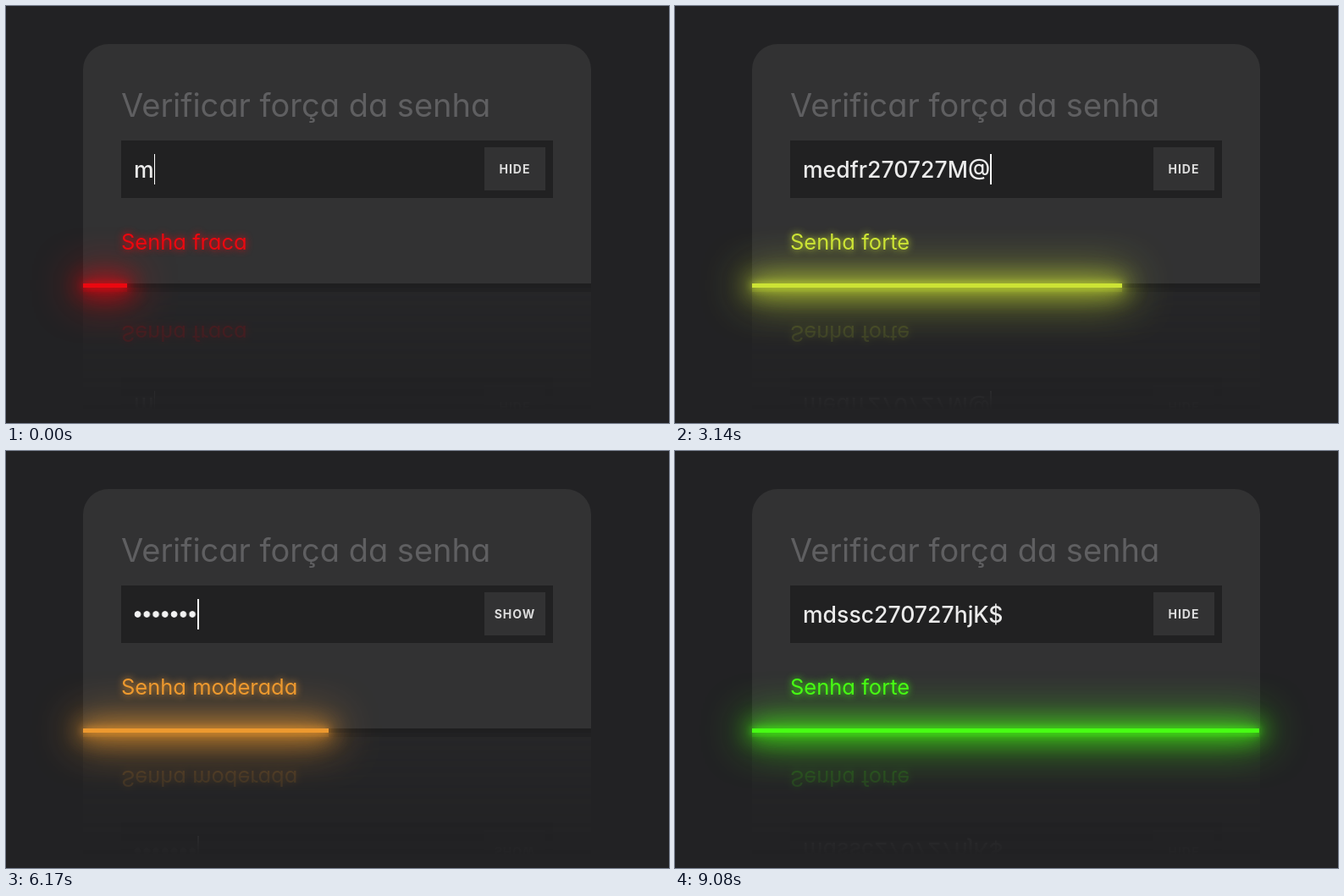
An HTML page for the animation above (9140 ms loop, 783 px wide and 493 px high).

```html
<!DOCTYPE html>
<html lang="pt">
<head>
<meta charset="utf-8">
<title>Verificar força da senha</title>
<style>
  html, body { margin: 0; width: 100%; height: 100%; overflow: hidden; background: #222224; }
  body {
    position: relative;
    font-family: Inter, "Open Sans", sans-serif;
    font-feature-settings: "cv11";
    font-optical-sizing: none;
  }
  #card, #card div { position: absolute; top: 0; left: 0; white-space: pre; }
  #card#card {
    left: 91px; top: 45px; width: 600px; height: 288px;
    -webkit-box-reflect: below 0 linear-gradient(transparent 50%, #0004);
  }
  #card #panel { width: 600px; height: 283px; border-radius: 30px 30px 0 0; background: #323233; }
  #card #title { left: 45px; top: 47px; font-size: 38px; line-height: 50px; color: #5f5f61; }
  #card #field { left: 45px; top: 114px; width: 510px; height: 68px; background: #212122; }
  #card #entry {
    left: 15px; height: 68px; display: flex; align-items: center;
    font-size: 26.6px; font-weight: 500; color: #ebebeb;
  }
  #card #dots {
    position: static; height: 8px;
    background: radial-gradient(circle at 4.5px 50%, #f2f2f2 3.4px, transparent 4.2px) 0 0 / 10.77px 8px;
  }
  #card #caret { position: static; width: 1.5px; height: 36px; background: #fff; }
  #card #button {
    left: 429px; top: 8px; width: 72px; height: 51px; background: #323233; color: #dcdcdc;
    display: flex; align-items: center; justify-content: center;
    font-size: 14px; font-weight: 700; letter-spacing: 1px;
  }
  #card #message {
    left: 45px; top: 214px; font-size: 25.5px; line-height: 40px;
    text-shadow: 0 0 8px currentColor;
  }
  #card #track { top: 283px; width: 600px; height: 5px; background: #1f1f20; }
  #card #bar {
    height: 5px; background: currentColor;
    box-shadow: 0 0 10px currentColor, 0 0 26px 3px currentColor, 0 0 52px 6px currentColor;
  }
</style>
</head>
<body>
<div id="card">
  <div id="panel"></div>
  <div id="title">Verificar força da senha</div>
  <div id="field">
    <div id="entry"><span id="text"></span><div id="dots"></div><div id="caret"></div></div>
    <div id="button"></div>
  </div>
  <div id="message"></div>
  <div id="track"><div id="bar"></div></div>
</div>
<script>
const LOOP = 9140, TRANSITION = 500, HIDDEN_FROM = 5390, HIDDEN_TO = 7600;
const LEVELS = [
  { label: '', width: 0, color: [235, 8, 16] },
  { label: 'Senha fraca', width: 10, color: [235, 8, 16] },
  { label: 'Senha moderada', width: 66, color: [238, 220, 61] },
  { label: 'Senha forte', width: 100, color: [70, 255, 20] }
];
const $ = id => document.getElementById(id);

const strength = s => /\W/.test(s) ? 3 : /\d/.test(s) && s.length >= 7 ? 2 : 1;

// Keystrokes and the strength changes they cause
const keys = [], changes = [{ time: -1000, level: 0 }];
let value = '';
function press(time, next, typed) {
  value = next;
  keys.push({ time, value, typed });
  const level = strength(value);
  if (level !== changes[changes.length - 1].level) changes.push({ time, level });
}
function type(str, start, step = 0) {
  [...str].forEach((ch, i) => press(start + i * step, value + ch, true));
}
function erase(count, start, step = 0) {
  for (let i = 0; i < count; i++) press(start + i * step, value.slice(0, -1), false);
}

type('m', -290);
type('edfr270727dfsaA@', 100, 100);
erase(6, 2215, 120);
type('M', 2930);
type('@', 3062);
erase(12, 3792, 130);
type('dssc27', 5470, 100);
type('0727hjK$', 6175, 99);
erase(1, 7900);
type('$', 8630);

// cubic-bezier(.25, .1, .25, 1)
function ease(x) {
  if (x >= 1) return 1;
  const curve = (u, a, b) => 3 * a * u * (1 - u) ** 2 + 3 * b * u * u * (1 - u) + u ** 3;
  let lo = 0, hi = 1;
  for (let i = 0; i < 20; i++) {
    const mid = (lo + hi) / 2;
    if (curve(mid, .25, .25) < x) lo = mid; else hi = mid;
  }
  return curve(lo, .1, 1);
}

const mix = (a, b, k) => a + (b - a) * k;
const lastBefore = (list, t) => list.filter(e => e.time <= t).pop();

function draw(t) {
  const key = lastBefore(keys, t), change = lastBefore(changes, t);
  const from = LEVELS[changes[changes.indexOf(change) - 1].level];
  const to = LEVELS[change.level];
  const k = ease((t - change.time) / TRANSITION);
  const color = `rgb(${to.color.map((c, i) => mix(from.color[i], c, k))})`;
  const hidden = t >= HIDDEN_FROM && t < HIDDEN_TO;
  const blinkOn = (t - key.time) % 1000 < 440;

  $('text').textContent = hidden ? '' : key.value;
  $('dots').style.width = (hidden ? key.value.length * 10.77 : 0) + 'px';
  $('caret').style.visibility = blinkOn === key.typed ? 'visible' : 'hidden';
  $('button').textContent = hidden ? 'SHOW' : 'HIDE';
  $('message').textContent = to.label;
  $('message').style.color = $('bar').style.color = color;
  $('bar').style.width = mix(from.width, to.width, k) + '%';
}

const begin = performance.now();
function tick() {
  draw((performance.now() - begin) % LOOP);
  requestAnimationFrame(tick);
}
tick();
</script>
</body>
</html>
```
